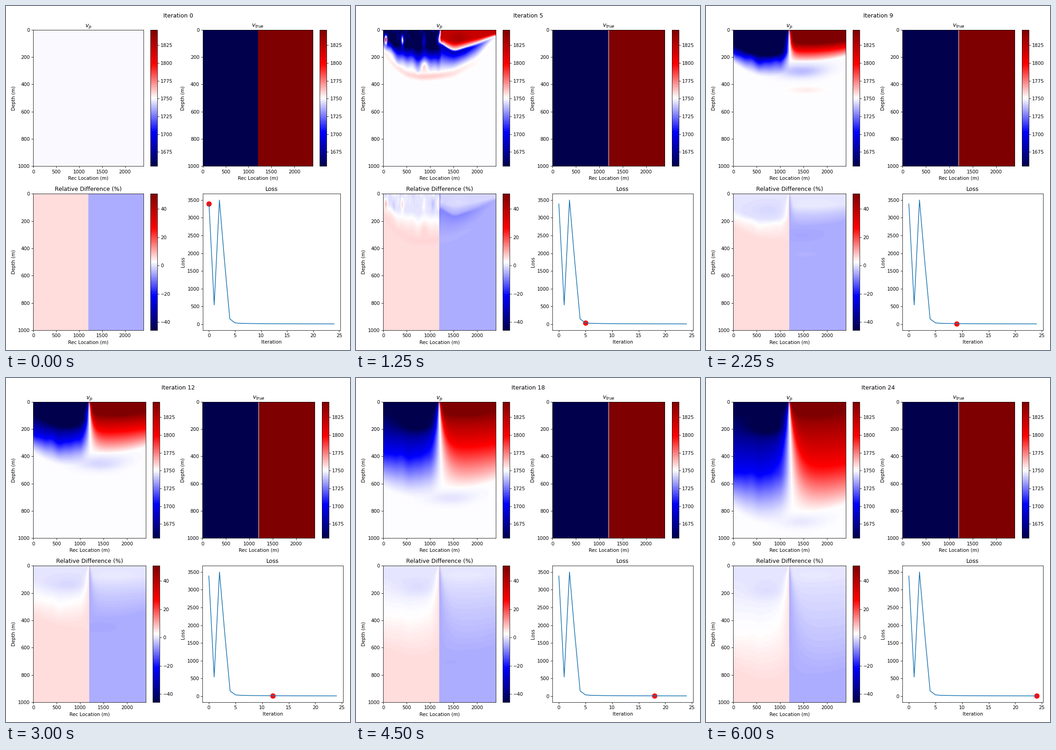
Animation, 748 px wide and 748 px high, one loop 6250 ms. Source, as a matplotlib script:

```python
import numpy as np
import matplotlib.pyplot as plt
from matplotlib.animation import FuncAnimation

SIZE = 748
N_ITER = 25
V_MIN, V_MAX = 1655.0, 1846.5
V_MID, V_HALF = (V_MIN + V_MAX) / 2, (V_MAX - V_MIN) / 2
NX, NZ = 244, 296
x = ((np.arange(NX) + 0.5) * 2400 / NX)[None, :]
z = ((np.arange(NZ) + 0.5) * 1000 / NZ)[:, None]
v_true = np.where(x < 1200, V_MIN, V_MAX) + 0 * z
ITERS = np.arange(N_ITER)
LOSS = np.r_[3390, 540, 3500, 1750, 145, 35, 130 / ITERS[6:]]


def unit(a):
    return np.clip(a, 0, 1)


def blob(cx, cz, sx, sz):
    return np.exp(-((x - cx) / sx) ** 2 - ((z - cz) / sz) ** 2)


def smooth(a, sigma, axis):
    r = int(3 * sigma) + 1
    kern = np.exp(-0.5 * (np.arange(-r, r + 1) / sigma) ** 2)
    kern /= kern.sum()
    pad = [(0, 0), (0, 0)]
    pad[axis] = (r, r)
    return np.apply_along_axis(np.convolve, axis, np.pad(a, pad, mode="edge"),
                               kern, mode="valid")


def noise(seed, sx, sz):
    a = np.random.default_rng(seed).normal(size=(NZ, NX))
    a = smooth(smooth(a, sx, 1), sz, 0)
    return a / a.std()


def curve(xs, ys):
    return smooth(np.interp(x, xs, ys), 6, 1)


def ramp(d1, d2, d3, p):
    """1 down to d1, 0.5 at d2, 0 at d3."""
    return (1 - 0.5 * unit((z - d1) / (d2 - d1))
            - 0.5 * (1 - (1 - unit((z - d2) / (d3 - d2))) ** p))


STREAKS = noise(3, 1.5, 8.0)
RAGS = noise(8, 3.0, 3.0)
SPECKS = noise(5, 2.0, 1.2)
BOWL = curve([0, 200, 500, 850, 1200, 1500, 2000, 2400],
             [130, 230, 305, 325, 315, 300, 215, 50])
EDGE = curve([1200, 1300, 1500, 2000, 2400], [85, 115, 155, 100, 45])
WAVE = (9 * np.sin(x / 75) + 5 * np.sin(x / 41 + 1)) * unit((1150 - x) / 150)


def early(k):
    """Bowl-shaped shallow update, noisy at first."""
    amp = np.interp(k, [1, 2, 3, 4, 5, 7], [0.55, 1.3, 1, 0.35, 0.04, 0])
    spots = np.interp(k, [3, 4, 5, 8], [0, 0.7, 1, 0])
    rag = BOWL * (1 + 0.04 * np.sin(x / 37) + 0.05 * np.sin(x / 61 + 2))
    left = -ramp(0.42 * rag, 0.64 * rag, rag, 1.6)

    top = np.interp(k, [1, 3, 5], [0.6, 0.92, 0.72])
    red = top * unit((EDGE - z) / (0.4 * EDGE)) + 0.12 * blob(1600, 60, 180, 40)
    blue = unit((z - EDGE) / 20) * unit((BOWL - z) / (BOWL - EDGE + 1)) ** 1.3
    right = np.where(z < EDGE, red, -0.85 * blue * unit((2450 - x) / 700))

    mix = unit((x - 1190) / 50)
    t = left * (1 - mix) + right * mix
    t = t + 0.1 * np.exp(-((z - BOWL - 25) / 24) ** 2 - ((x - 950) / 800) ** 2)
    t = t + spots * (1.5 * blob(60, 70, 32, 32) + 0.95 * blob(415, 80, 30, 45)
                     + 0.5 * blob(870, 80, 40, 50) + 0.7 * blob(1195, 75, 35, 40)
                     + 0.15 * blob(870, 260, 90, 40) - 0.35 * blob(230, 80, 40, 50)
                     - 0.4 * blob(1060, 80, 40, 60))
    side = unit((1280 - x) / 60)
    shallow = 1 / (1 + np.exp((z - 95) / 12))
    t = t + amp * side * 1.9 * (STREAKS + 0.15) * shallow
    t = t + amp * 0.17 * RAGS * side / (1 + np.exp((z - 250) / 25))
    return t + amp * 0.04 * SPECKS * blob(750, 370, 500, 150)


def late(k):
    """Two-sided front that sinks with every iteration."""
    def at(*vals):
        return np.interp(k, [9, 14, 18, 24], vals)

    q = unit(((x - 750) / 750) ** 2)
    left = ramp(at(185, 130, 115, 110) * (1 - 0.4 * q),
                at(235, 340, 405, 530) * (1 - at(0.33, 0.14, 0.1, 0.05) * q) + WAVE,
                at(350, 560, 710, 900) * (1 - at(0.3, 0.14, 0.1, 0.12) * q), 1.4)
    left = left + 0.2 * blob(740, at(120, 150, 170, 190), 400, 60)

    rise = 1 - at(0.18, 0.1, 0.09, 0.07) * unit((x - 1500) / 900) ** 2
    white = at(240, 485, 640, 815) * rise
    right = ramp(at(95, 75, 65, 60) * rise, at(160, 270, 340, 490) * rise, white, 1.0)
    right = right + 0.1 * blob(1750, 80, 450, 45)

    seam = 1195 + np.minimum(0.07 * z, 50)
    lam_l = 8 + 260 * (1 - np.exp(-z / 280))
    lam_r = 12 + 0.5 * z
    t = (right * np.tanh(np.maximum(x - seam, 0) / lam_r)
         - left * np.tanh(np.maximum(seam - x, 0) / lam_l))
    t = t - at(0.13, 0.06, 0.05, 0.04) * np.exp(
        -((z - white - 65) / 48) ** 2 - ((x - 1450) / 500) ** 2)
    return t + at(0.04, 0, 0, 0) * blob(1550, 445, 350, 25)


def velocity(k):
    if k == 0:
        return np.full((NZ, NX), 1750.0)
    w = unit((k - 5) / 4)
    t = (1 - w) * early(k) + w * late(k)
    return V_MID + V_HALF * (t - 0.004)


def misfit(v):
    return (v - v_true) / v_true * 100


fig = plt.figure(figsize=(10, 10), dpi=SIZE / 10)
title = fig.suptitle("Iteration 0")
boxes = []


def panel(col, row, name, xlabel, ylabel):
    ax = fig.add_axes([0.1 + 0.5 * col, 0.55 - 0.5 * row, 0.3, 0.4])
    ax.set_title(name)
    ax.set_xlabel(xlabel)
    ax.set_ylabel(ylabel)
    return ax


def section(col, row, name, data, lo, hi):
    ax = panel(col, row, name, "Rec Location (m)", "Depth (m)")
    im = ax.imshow(data, cmap="seismic", vmin=lo, vmax=hi, aspect="auto",
                   extent=(0, 2400, 1000, 0), interpolation="nearest")
    cax = fig.add_axes([0.4 + 0.5 * col, 0.55 - 0.5 * row, 0.02, 0.4])
    fig.colorbar(im, cax=cax)
    boxes.append((ax, cax, col, row))
    return ax, im


start = velocity(0)
_, vp_im = section(0, 0, "$v_p$", start, V_MIN, V_MAX)
true_ax, _ = section(1, 0, "$v_{true}$", v_true, V_MIN, V_MAX)
_, diff_im = section(0, 1, "Relative Difference (%)", misfit(start), -45.7, 50.6)
seam_line = true_ax.axvline(1200, color="white", lw=0.9)

loss_ax = panel(1, 1, "Loss", "Iteration", "Loss")
loss_ax.plot(ITERS, LOSS)
loss_ax.set_xlim(-1.2, 25.2)
loss_ax.set_ylim(-170, 3675)
dot = loss_ax.scatter([0], [LOSS[0]], s=100, color="red")
boxes.append((loss_ax, None, 1, 1))


def place(ax, left, top, width, height=296.4):
    ax.set_position([left / SIZE, 1 - (top + height) / SIZE,
                     width / SIZE, height / SIZE])


def layout(first):
    width = 298.9 if first else 305.3
    for ax, cax, col, row in boxes:
        left = (427.8 if first else 427.2) if col else 59.4
        top = 408.4 if row else 51.9
        if cax is None:
            place(ax, left, top, width)
        else:
            place(ax, left, top, 0.8 * width)
            place(cax, left + 0.85 * width + 0.5, top, 14.8)


def update(k):
    layout(k == 0)
    v = velocity(k)
    vp_im.set_data(v)
    diff_im.set_data(misfit(v))
    seam_line.set_visible(k > 0)
    dot.set_offsets([[k, LOSS[k]]])
    title.set_text(f"Iteration {k}")
    return vp_im, diff_im, seam_line, dot, title


anim = FuncAnimation(fig, update, frames=N_ITER, interval=250,
                     repeat=True, repeat_delay=0, blit=False)
plt.show()
```
